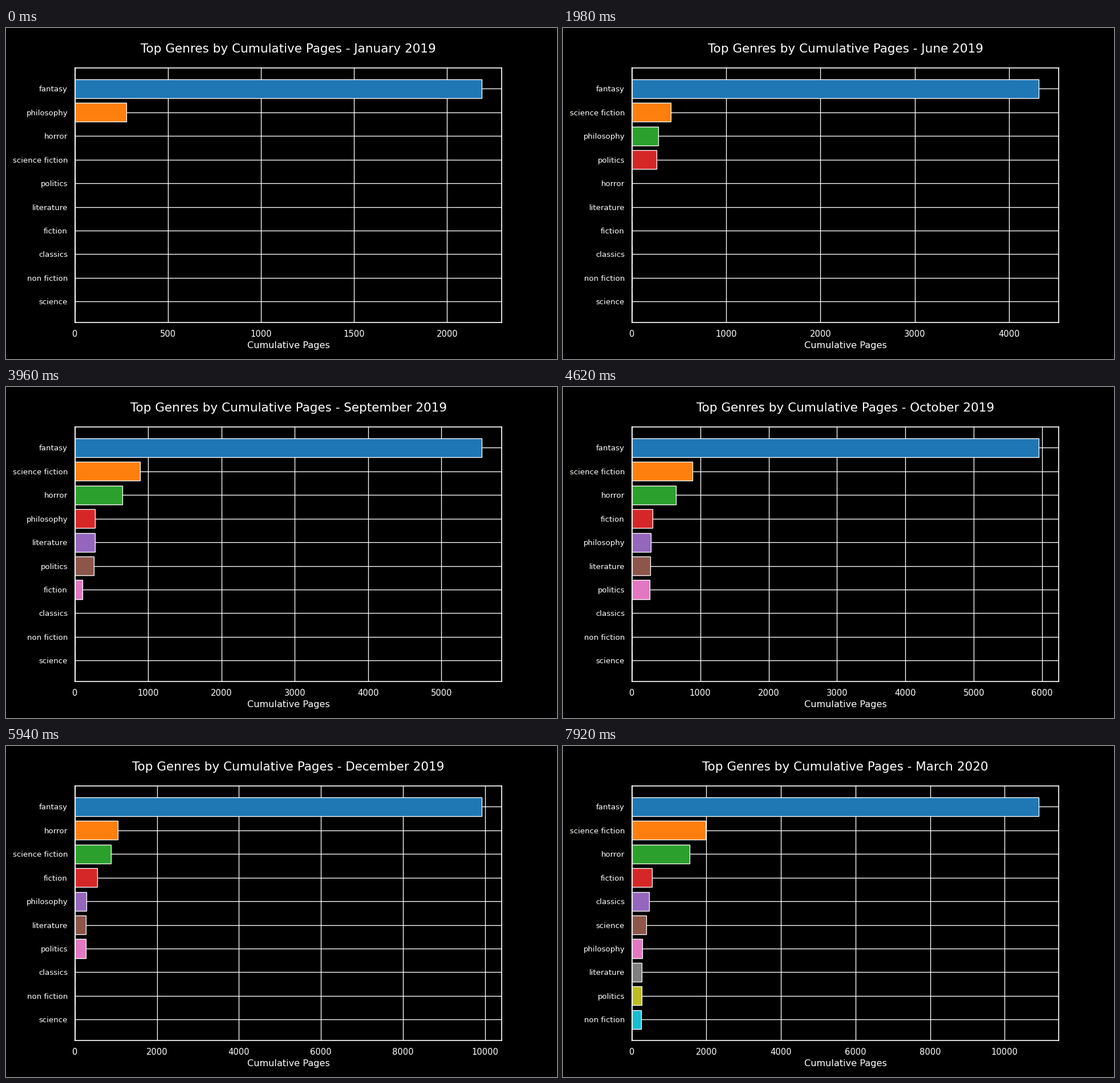
A matplotlib script that plays this animation: 966x580 px, repeating every 8 s.

```python
import matplotlib.pyplot as plt
from matplotlib.animation import FuncAnimation

STEP_MS, INTERVAL_MS, LOOP_MS = 660, 40, 8000
SCALE = 0.966  # point sizes relative to a 1000 px wide figure

GENRES = ["fantasy", "philosophy", "horror", "science fiction", "politics",
          "literature", "fiction", "classics", "non fiction", "science"]

# Pages read per genre in each month with any reading
MONTHS = [
    ("January 2019", {"fantasy": 2185, "philosophy": 278}),
    ("March 2019", {"science fiction": 410}),
    ("May 2019", {"fantasy": 1505}),
    ("June 2019", {"fantasy": 623, "politics": 262}),
    ("July 2019", {"literature": 271}),
    ("August 2019", {"horror": 647, "science fiction": 476, "fiction": 107}),
    ("September 2019", {"fantasy": 1237}),
    ("October 2019", {"fantasy": 396, "fiction": 195}),
    ("November 2019", {"fantasy": 2154, "horror": 406}),
    ("December 2019", {"fantasy": 1817, "fiction": 245}),
    ("January 2020", {"fantasy": 360, "horror": 497}),
    ("February 2020", {"science fiction": 1099, "classics": 465}),
    ("March 2020", {"fantasy": 633, "science": 387, "non fiction": 246}),
]


def rankings():
    """Yield (month, [(genre, total), ...]) sorted by running total."""
    totals = dict.fromkeys(GENRES, 0)
    for month, pages in MONTHS:
        for genre, count in pages.items():
            totals[genre] += count
        yield month, sorted(totals.items(), key=lambda item: -item[1])


STATES = list(rankings())

plt.style.use("dark_background")
plt.rcParams.update({
    "font.family": "DejaVu Sans",
    "axes.linewidth": 1.25 * SCALE,
    "axes.axisbelow": True,
    "axes.grid": True,
    "grid.color": "white",
    "grid.linewidth": SCALE,
    "xtick.labelsize": 11 * SCALE,
    "ytick.labelsize": 10 * SCALE,
    "xtick.bottom": False,
    "ytick.left": False,
    "xtick.major.size": 6 * SCALE,
    "ytick.major.size": 6 * SCALE,
    "xtick.major.pad": 3.5 * SCALE,
    "ytick.major.pad": 3.5 * SCALE,
})

fig, ax = plt.subplots(figsize=(9.66, 5.8), dpi=100)
rows = range(len(GENRES))
bars = ax.barh(rows, [0] * len(GENRES), height=0.8,
               color=[f"C{i}" for i in rows] and plt.get_cmap("tab10").colors,
               edgecolor="white", linewidth=SCALE)
ax.set_ylim(9.89, -0.89)
ax.set_yticks(rows)
ax.set_xlabel("Cumulative Pages", fontsize=12 * SCALE, labelpad=4 * SCALE)


def update(frame):
    index = (frame * INTERVAL_MS + INTERVAL_MS // 2) // STEP_MS
    month, ranking = STATES[min(index, len(STATES) - 1)]
    for bar, (_, total) in zip(bars, ranking):
        bar.set_width(total)
    ax.set_xlim(0, ranking[0][1] * 1.05)
    ax.set_yticklabels([genre for genre, _ in ranking])
    ax.set_title(f"Top Genres by Cumulative Pages - {month}",
                 fontsize=16 * SCALE, pad=20 * SCALE)
    return list(bars)


anim = FuncAnimation(fig, update, frames=LOOP_MS // INTERVAL_MS,
                     interval=INTERVAL_MS, repeat=True, repeat_delay=0)
plt.show()
```
